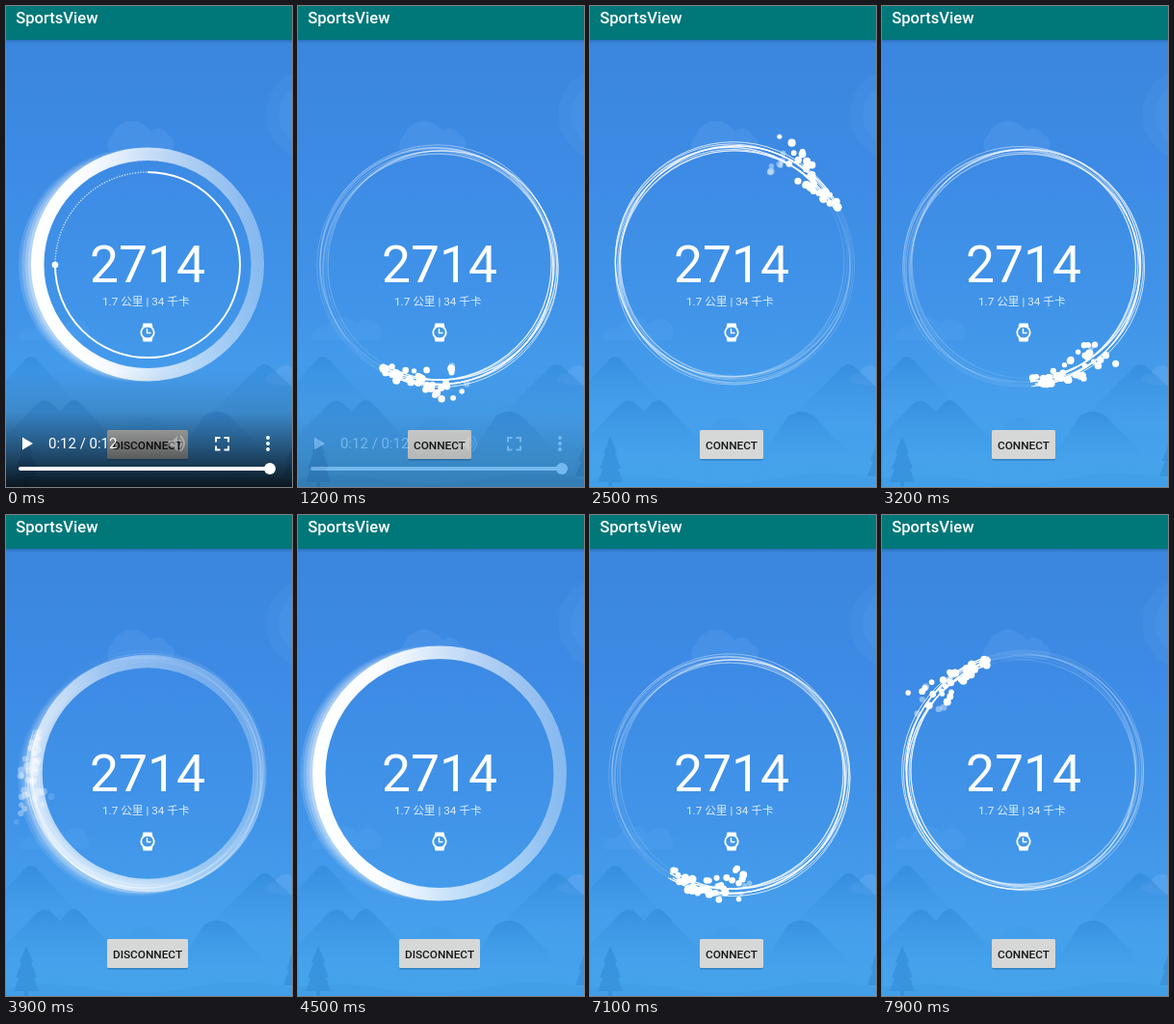
Animation of 297 by 498 pixels, one loop 8000 ms. Source, as an HTML page with a canvas:

```html
<!DOCTYPE html>
<html lang="en">
<head>
<meta charset="utf-8">
<title>SportsView</title>
<style>
  html, body { margin: 0; width: 100%; height: 100%; overflow: hidden; background: #3d8de6; }
  svg, canvas { position: absolute; left: 0; top: 0; width: 297px; height: 498px; display: block; }
  text { font-family: Roboto, "Noto Sans CJK SC", "Noto Sans CJK", sans-serif; }
</style>
</head>
<body>
<svg viewBox="0 0 297 498">
  <defs>
    <linearGradient id="sky" x2="0" y2="1">
      <stop offset="0" stop-color="#3a85dd"/>
      <stop offset=".35" stop-color="#3d8be5"/>
      <stop offset=".65" stop-color="#4195e9"/>
      <stop offset=".84" stop-color="#469fec"/>
      <stop offset="1" stop-color="#44a3ea"/>
    </linearGradient>
    <linearGradient id="hill" x2="0" y2="1">
      <stop offset="0" stop-color="#2f87d8" stop-opacity=".6"/>
      <stop offset="1" stop-color="#3a96e2" stop-opacity="0"/>
    </linearGradient>
    <linearGradient id="barShadow" x2="0" y2="1">
      <stop offset="0" stop-color="#053c70" stop-opacity=".3"/>
      <stop offset="1" stop-color="#053c70" stop-opacity="0"/>
    </linearGradient>
  </defs>
  <rect width="297" height="498" fill="url(#sky)"/>
  <g fill="#6fb0f2">
    <circle cx="317" cy="112" r="47" opacity=".1"/>
    <circle cx="317" cy="112" r="34" opacity=".1"/>
    <path opacity=".2" d="M107 150a12 12 0 0 1 3-16a22 22 0 0 1 40-4a11 11 0 0 1 18 4a9 9 0 0 1 3 16z"/>
    <path opacity=".12" d="M14 346a10 10 0 0 1 15-11a18 18 0 0 1 32-5a14 14 0 0 1 23 16z"/>
    <path opacity=".4" d="M268 388q4-9 11-7q3-9 12-9q5 0 6 3v18q-18 0-29-5z"/>
  </g>
  <g fill="url(#hill)">
    <path d="M-10 398L20 366q6-6 12 0L82 420H-10z"/>
    <path d="M215 420L262 374q7-6 13 0l22 20v40h-82z"/>
    <path d="M-5 450L32 412q8-7 16 0l8 8 8-9q7-6 13 0L128 465H-5z"/>
    <path d="M178 468L205 425q14-10 28 0L275 468z"/>
    <path d="M80 468L132 430q12-8 24 0L206 468z" opacity=".2"/>
  </g>
  <g fill="#2b80cd" opacity=".42">
    <path d="M21 446l7 17h-2l6 16h-3l5 14H23v5h-4v-5H8l5-14h-3l6-16h-2z"/>
    <path d="M297 455l-6 16h3l-6 16h9z"/>
    <path d="M0 498v-9q45-7 95 2t105-3q50-9 97 2v8z" opacity=".25"/>
  </g>
  <rect y="35" width="297" height="4" fill="url(#barShadow)"/>
  <rect width="297" height="35" fill="#007779"/>
  <text x="10.2" y="18" font-size="16.6" font-weight="500" fill="#fff">SportsView</text>
</svg>

<canvas id="rings"></canvas>

<svg viewBox="0 0 297 498">
  <defs>
    <linearGradient id="shade" x2="0" y2="1">
      <stop offset="0" stop-opacity="0"/>
      <stop offset=".35" stop-opacity=".14"/>
      <stop offset=".65" stop-opacity=".46"/>
      <stop offset="1" stop-opacity=".86"/>
    </linearGradient>
  </defs>
  <g fill="#fff" text-anchor="middle">
    <text x="147" y="286" font-size="53.4">2714</text>
    <text x="145.3" y="309.8" font-size="11.7" opacity=".82">1.7 公里 | 34 千卡</text>
  </g>
  <g fill="#fff">
    <path d="M142.500 328.500h9l1 4h-11zM141.500 343.500h11l-1 4h-9z"/>
    <circle cx="147" cy="338" r="6.7" fill="none" stroke="#fff" stroke-width="1.8"/>
    <path d="M146.500 334v4.500h4" fill="none" stroke="#fff" stroke-width="1.4"/>
  </g>
  <g id="button">
    <rect class="face" y="440.5" height="30" rx="2" fill="#0a3a66" opacity=".3"/>
    <rect class="face" y="439" height="30" rx="1.5" fill="#d6d7d7"/>
    <text id="label" x="147" y="459" font-size="11.8" font-weight="500" text-anchor="middle" fill="#161616"></text>
  </g>
  <g id="controls" fill="#fff">
    <rect y="378" width="297" height="120" fill="url(#shade)"/>
    <circle id="ripple" cx="21" cy="453" r="18"/>
    <path d="M17 446.5v13l11-6.5z"/>
    <text x="44" y="458.3" font-size="15">0:12 / 0:12</text>
    <g opacity=".35">
      <path d="M169 450h4l5-5v16l-5-5h-4z"/>
      <path d="M180 449q4 4 0 8M181 445q8 8 0 16" fill="none" stroke="#fff" stroke-width="1.8"/>
    </g>
    <path d="M218 451.500v-4.500h4.500M226.500 447h4.500v4.500M231 455.500v4h-4.500M222.500 459.500h-4.500v-4" fill="none" stroke="#fff" stroke-width="2"/>
    <circle cx="272" cy="447" r="1.9"/>
    <circle cx="272" cy="453" r="1.9"/>
    <circle cx="272" cy="459" r="1.9"/>
    <rect x="13" y="477" width="262" height="4" rx="2"/>
    <circle cx="274" cy="479" r="6"/>
  </g>
</svg>

<script>
const LOOP = 8000, STEP = 100;
const CX = 147, CY = 267.5;
const TAU = Math.PI * 2;
const SPIN = 0.1636;       // degrees per ms
const BIRTH = 6;           // ms between sparks
const LIFE = 240;

const $ = id => document.getElementById(id);
const canvas = $('rings'), ctx = canvas.getContext('2d');
const scale = window.devicePixelRatio || 1;
canvas.width = 297 * scale;
canvas.height = 498 * scale;

const rad = deg => deg * Math.PI / 180;
const white = a => `rgba(255,255,255,${Math.max(0, a)})`;
const ramp = (t, from, to) => Math.min(1, Math.max(0, (t - from) / (to - from)));
const ease = (t, from, to) => { const p = ramp(t, from, to); return p * p * (3 - 2 * p); };
const random = n => { const s = Math.sin(n * 127.1 + 31.7) * 43758.5453; return s - Math.floor(s); };

function circle(x, y, r, width, style, from = 0, to = TAU) {
  ctx.beginPath();
  ctx.arc(x, y, r, from, to);
  ctx.lineWidth = width;
  ctx.strokeStyle = style;
  ctx.stroke();
}

function dot(x, y, r, alpha) {
  ctx.beginPath();
  ctx.arc(x, y, r, 0, TAU);
  ctx.fillStyle = white(alpha);
  ctx.fill();
}

const headAngle = t => t < 5000 ? 216 + (t - 1800) * SPIN : 120 + (t - 7100) * SPIN;

function drawSpinner(t, alpha) {
  const head = headAngle(t);
  ctx.globalAlpha = alpha;
  for (let i = 0; i < 8; i++) {
    const a = rad(head + (i - 3.5) * 36);
    const x = CX + 3.6 * Math.cos(a) + 1.6 * Math.cos(rad(head));
    const y = CY + 3.6 * Math.sin(a) + 1.6 * Math.sin(rad(head));
    const trail = ctx.createConicGradient(rad(head), x, y);
    trail.addColorStop(0, white(0.06));
    trail.addColorStop(0.3, white(0.3));
    trail.addColorStop(0.7, white(0.75));
    trail.addColorStop(1, white(1));
    circle(x, y, 118.8 + (i * 3 % 8) * 0.6, i % 3 ? 0.9 : 1.4, trail);
  }
  const newest = Math.floor(t / BIRTH);
  for (let k = newest; k > newest - LIFE / BIRTH; k--) {
    const born = k * BIRTH, age = (t - born) / LIFE;
    const a = rad(headAngle(born) + (random(k) - 0.5) * 6);
    const r = 121.5 + (random(k + 0.37) - 0.5) * (12 + 42 * age * age);
    const fade = age > 0.8 && random(k + 0.6) > 0.6 ? 0.4 : 1;
    dot(CX + r * Math.cos(a), CY + r * Math.sin(a), 2.8 + 1.6 * random(k + 0.81) - 0.4 * age, fade);
  }
}

function fadeAcross(x, y, r, angle, stops) {
  const dx = r * Math.cos(angle), dy = r * Math.sin(angle);
  const g = ctx.createLinearGradient(x + dx, y + dy, x - dx, y - dy);
  stops.forEach(([at, a]) => g.addColorStop(at, white(a)));
  return g;
}

function drawRing(r, degrees, alpha) {
  const a = rad(degrees);
  ctx.globalAlpha = alpha;
  for (let i = 4; i > 0; i--) {
    const x = CX + 3.2 * i * Math.cos(a), y = CY + 3.2 * i * Math.sin(a);
    circle(x, y, r, 13.5, fadeAcross(x, y, r, a, [[0, 0.34 - 0.05 * i], [0.55, 0]]));
  }
  circle(CX, CY, r, 13.5, fadeAcross(CX, CY, r + 7, a, [[0, 1], [0.25, 0.97], [0.5, 0.74], [1, 0.36]]));
}

function drawDial(alpha) {
  const y = 268, r = 96;
  ctx.globalAlpha = alpha;
  circle(CX, y, r, 1.9, white(1), -Math.PI / 2, Math.PI);
  ctx.setLineDash([1.3, 1.5]);
  circle(CX, y, r, 1.4, white(0.75), Math.PI, Math.PI * 1.5);
  ctx.setLineDash([]);
  dot(CX - r, y, 3.3, 1);
}

function drawButton(connected) {
  const half = connected ? 42 : 33;
  $('label').textContent = connected ? 'DISCONNECT' : 'CONNECT';
  document.querySelectorAll('.face').forEach(face => {
    face.setAttribute('x', 147 - half);
    face.setAttribute('width', half * 2);
  });
}

function render(t) {
  const paused = t < 1000;
  const linked = paused ? 1 : ramp(t, 3700, 4000) - ramp(t, 6100, 6300);
  const swell = ease(t, 3700, 4500) - ease(t, 4500, 5100);
  const dial = paused ? 1 : ramp(t, 4600, 5100) * linked;

  ctx.setTransform(scale, 0, 0, scale, 0, 0);
  ctx.clearRect(0, 0, 297, 498);
  if (linked < 1) drawSpinner(t, 1 - linked);
  if (linked > 0) drawRing(114.3 + 10.9 * swell, paused ? 176 : 180 + (t - 4500) * 0.04, linked);
  if (dial > 0) drawDial(dial);

  drawButton(paused || (t >= 3700 && t < 6100));
  $('controls').setAttribute('opacity', 1 - ramp(t, 900, 1300));
  $('ripple').setAttribute('opacity', t >= 400 && t < 600 ? 0.18 : 0);
}

function frame(now) {
  render(Math.floor(now % LOOP / STEP) * STEP);
  requestAnimationFrame(frame);
}
render(0);
requestAnimationFrame(frame);
</script>
</body>
</html>
```
